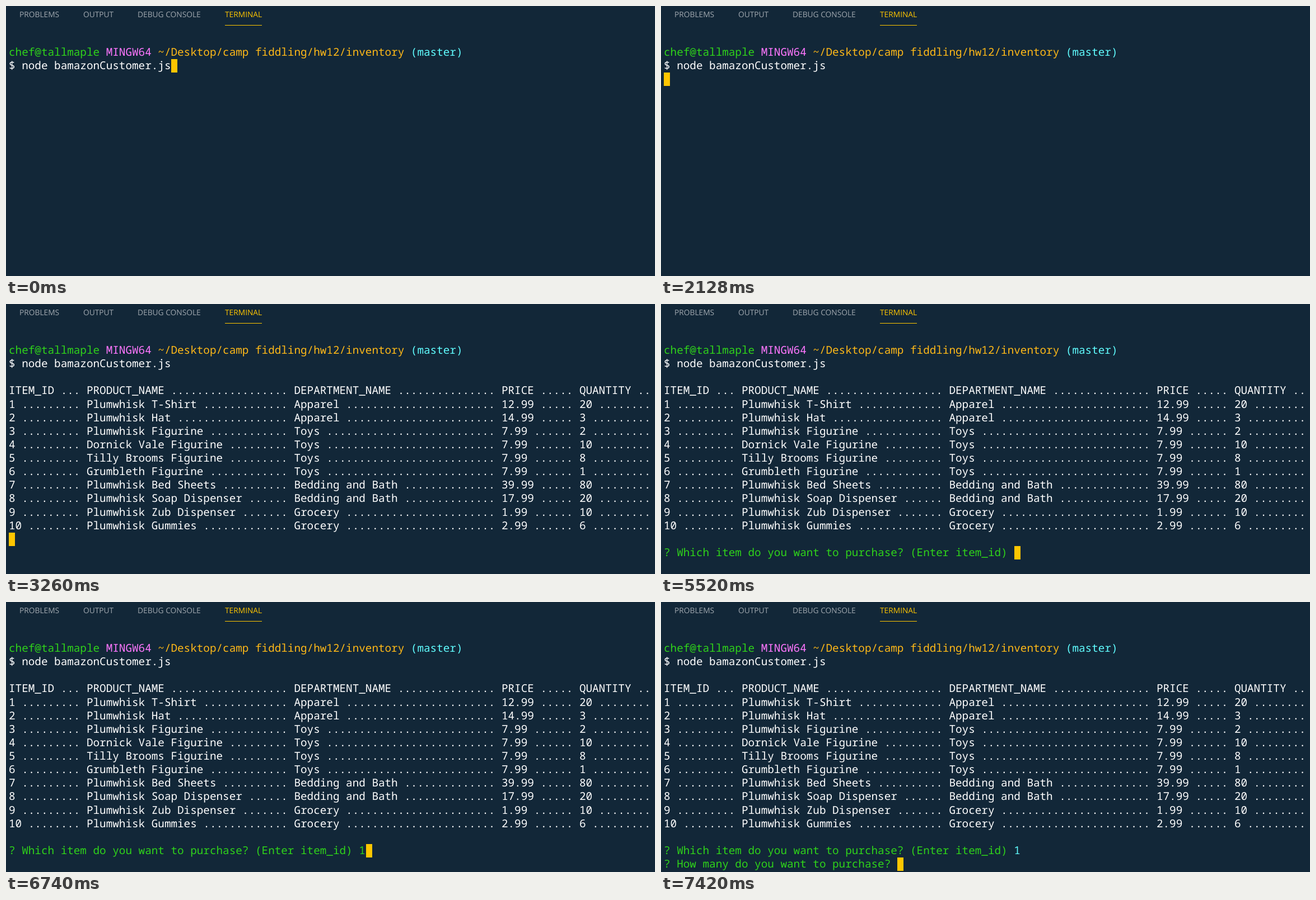
Write an HTML page that moves like this. It is 1159x483 px and loops after 8 s.

```html
<!DOCTYPE html>
<html lang="en">
<head>
<meta charset="utf-8">
<title>Terminal inventory</title>
<style>
  html, body { margin: 0; width: 100%; height: 100%; overflow: hidden; background: #122738; }
  body { position: relative; text-rendering: geometricPrecision; }

  .tab {
    position: absolute; top: 6px; height: 20px;
    font: 13.75px/20px "Open Sans", "Noto Sans", sans-serif;
    color: #a0a8af; white-space: nowrap;
  }
  .tab.on { color: #ffc600; }
  .tab.on::after {
    content: ""; position: absolute; left: 0; right: 0; top: 28px;
    height: 1px; background: #ffc600;
  }

  .row {
    position: absolute; left: 5px; height: 24px;
    font: 19.305px/24px "Noto Sans Mono", "DejaVu Sans Mono", monospace;
    color: #fff; white-space: pre;
    font-variant-ligatures: none;
  }
  .green { color: #2fd31a; }
  .pink { color: #ff77ff; }
  .gold { color: #ffb918; }
  .cyan { color: #60fdff; }

  #cursor {
    position: absolute; width: 11px; height: 24px; background: #ffc600;
    animation: cursor 8s step-end infinite;
  }
  @keyframes cursor {
    0%      { left: 295px; top: 95px; }
    5.375%  { left: 5px;   top: 119px; }
    40.75%  { left: 5px;   top: 409px; }
    46.125% { left: 631px; top: 433px; }
    84.25%  { left: 643px; top: 433px; }
    92.75%  { left: 422px; top: 457px; }
  }

  .list, .ask, .reply, .count { animation: 8s step-end infinite; }
  .list  { animation-name: list; }
  .ask   { animation-name: ask; }
  .reply { animation-name: reply; }
  .count { animation-name: count; }
  @keyframes list  { 0% { visibility: hidden; } 40.75%  { visibility: visible; } }
  @keyframes ask   { 0% { visibility: hidden; } 46.125% { visibility: visible; } }
  @keyframes reply {
    0%     { visibility: hidden; color: #2fd31a; }
    84.25% { visibility: visible; color: #2fd31a; }
    92.75% { visibility: visible; color: #60fdff; }
  }
  @keyframes count { 0% { visibility: hidden; } 92.75% { visibility: visible; } }
</style>
</head>
<body>
<div class="tab" style="left:24px">PROBLEMS</div>
<div class="tab" style="left:138px">OUTPUT</div>
<div class="tab" style="left:235px">DEBUG CONSOLE</div>
<div class="tab on" style="left:391px">TERMINAL</div>

<div id="cursor"></div>

<script>
const TOP = 70, PITCH = 24.13;

function addRow(n, html, cls = "") {
  const el = document.createElement("div");
  el.className = "row " + cls;
  el.style.top = Math.round(TOP + n * PITCH) + "px";
  el.innerHTML = html;
  document.body.append(el);
}

const span = (cls, text) => `<span class="${cls}">${text}</span>`;

addRow(0, [
  span("green", "chef@tallmaple"),
  span("pink", "MINGW64"),
  span("gold", "~/Desktop/camp fiddling/hw12/inventory"),
  span("cyan", "(master)")
].join(" "));
addRow(1, "$ node bamazonCustomer.js");

// Each cell is filled with dots up to its column width.
const WIDTHS = [12, 32, 32, 12, 12];
const cell = (text, i) => (text + " ").padEnd(WIDTHS[i] - 1, ".") + " ";

const items = [
  "ITEM_ID|PRODUCT_NAME|DEPARTMENT_NAME|PRICE|QUANTITY",
  "1|Plumwhisk T-Shirt|Apparel|12.99|20",
  "2|Plumwhisk Hat|Apparel|14.99|3",
  "3|Plumwhisk Figurine|Toys|7.99|2",
  "4|Dornick Vale Figurine|Toys|7.99|10",
  "5|Tilly Brooms Figurine|Toys|7.99|8",
  "6|Grumbleth Figurine|Toys|7.99|1",
  "7|Plumwhisk Bed Sheets|Bedding and Bath|39.99|80",
  "8|Plumwhisk Soap Dispenser|Bedding and Bath|17.99|20",
  "9|Plumwhisk Zub Dispenser|Grocery|1.99|10",
  "10|Plumwhisk Gummies|Grocery|2.99|6"
];
items.forEach((item, i) => addRow(3 + i, item.split("|").map(cell).join(""), "list"));

addRow(15, "? Which item do you want to purchase? (Enter item_id) " + span("reply", "1"), "green ask");
addRow(16, "? How many do you want to purchase?", "green count");
</script>
</body>
</html>
```
